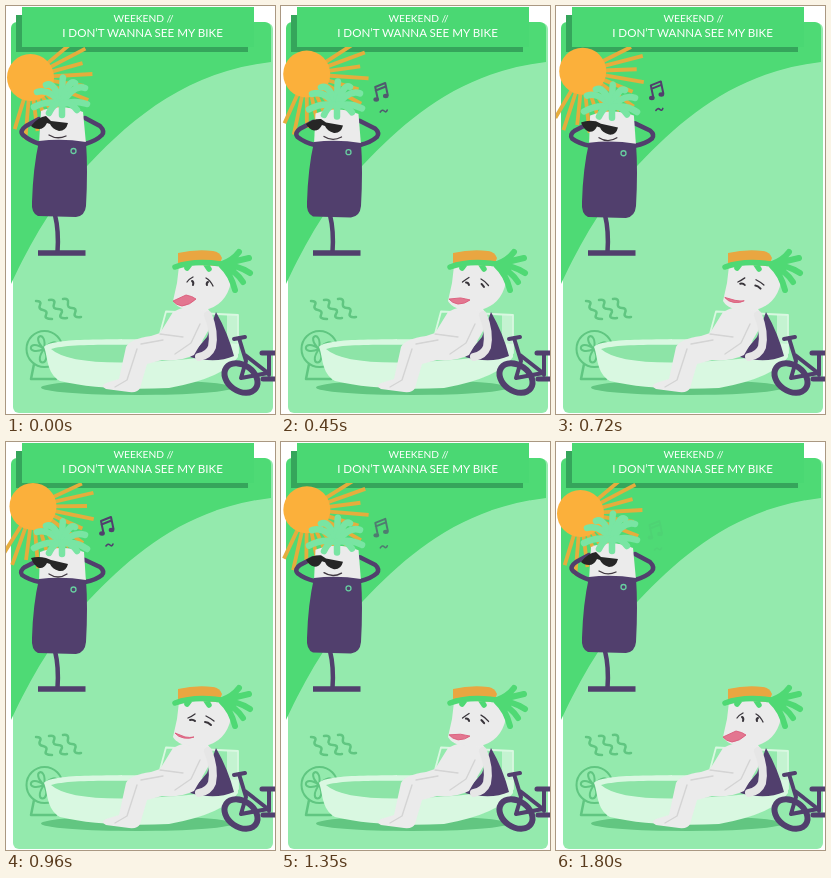
These frames come from a looping animation (269 by 408 pixels, 1830 ms). An HTML page:

```html
<!DOCTYPE html>
<html lang="en">
<head>
<meta charset="utf-8">
<title>Weekend</title>
<style>
html, body { margin: 0; width: 100%; height: 100%; overflow: hidden; background: #fff; }
svg { display: block; width: 269px; height: 408px; }
text { font-family: Lato, "Open Sans", sans-serif; fill: #fff; text-anchor: middle; }
.line { fill: none; stroke-linecap: round; stroke-linejoin: round; }
.ink { stroke: #513f6d; }
</style>
</head>
<body>
<svg viewBox="0 0 269 408">
  <clipPath id="card"><rect x="5" y="16" width="260" height="391" rx="6"/></clipPath>
  <rect x="7" y="17" width="260" height="390" rx="6" fill="#94eaad"/>
  <path clip-path="url(#card)" d="M0 0H269V55.500C185 64 130 108 82 159C47 196 25 236 5 278H0Z" fill="#4eda75"/>
  <path d="M10 9H242V46H10Z" fill="#35a55b"/>

  <!-- Sun -->
  <g id="sun">
    <g id="rays" stroke="#e5ad3d" stroke-width="3.800"></g>
    <circle r="23.500" fill="#fbb03b"/>
  </g>
  <path d="M16 1H248V41H16Z" fill="#4ad873"/>
  <text x="137.500" y="16" font-size="10.200">WEEKEND //</text>
  <text x="136.500" y="30.500" font-size="11.600">I DON’T WANNA SEE MY BIKE</text>

  <!-- Standing figure -->
  <g class="line ink" stroke-width="4.500">
    <path d="M49 209Q53 225 51.500 246"/>
    <path d="M32 247H79.500" stroke-width="5.500" stroke-linecap="butt"/>
    <path id="arms"/>
  </g>
  <path id="face" fill="#ebebeb"/>
  <path id="coat" fill="#513f6d"/>
  <circle id="badge" cx="67.500" r="2.500" fill="none" stroke="#67cfa0" stroke-width="1.300"/>
  <path id="glasses" fill="#262626"/>
  <path id="smile" class="line" stroke="#403840" stroke-width="1.300"/>
  <g id="hair" class="line" stroke="#79e5a3" stroke-width="6.500"></g>
  <g id="note" fill="#513f6d">
    <path class="line ink" d="M97.500 91L95 79L105 75L107.500 87M95.500 82.500L105.500 78.500" stroke-width="2"/>
    <ellipse cx="96" cy="91.500" rx="2.800" ry="2.200"/>
    <ellipse cx="105.500" cy="88" rx="2.800" ry="2.200"/>
    <path class="line ink" d="M100 104q2 -3 4 -1t3 -1" stroke-width="1.600"/>
  </g>

  <!-- Fan -->
  <g class="line" stroke="#60c681" stroke-width="2.500">
    <path d="M30 295q6 0 4 4t3 5t3 5t6 4M43 294q7 -1 5 4t4 5t3 5t6 4M57 293q6 -1 5 4t4 5t3 5t6 4"/>
    <circle cx="38.500" cy="343" r="18" stroke-width="2"/>
    <path d="M38 343C22 331 19 351 38 343C25 361 47 361 38 343C58 350 53 325 38 343C42 323 23 329 38 343" stroke-width="2"/>
    <path d="M28 358L25 373H50"/>
  </g>

  <!-- Pool -->
  <ellipse cx="131" cy="381.500" rx="96" ry="7.500" fill="#62c681"/>
  <path d="M221 308L232 309L231 348H221Z" fill="#c4f3d1"/>
  <path class="line" d="M152 335L160 305.500L232 309V347" stroke="#d9f8e1" stroke-width="1.800"/>
  <path d="M38 341C46 331 110 334 156 333L232 338V351Q218 372 163 382Q95 385 54 375C40 367 42 350 38 341Z" fill="#d9f8e1"/>
  <path d="M45 343C62 337 120 339 155 339L224 343Q210 352 155 355Q65 361 45 343Z" fill="#8de4a7"/>

  <!-- Reclining figure -->
  <path d="M184 351L201 331L210 306Q222 327 228 350Q210 358 184 351Z" fill="#513f6d"/>
  <path d="M167 306Q187 296 202 303Q207 308 202 325L188 349Q174 356 156 354L141 358L134 382Q132 387 123 386L100 383Q94 380 100 377L113 373L120 341Q124 333 145 330L154 327Z" fill="#ebebeb"/>
  <path class="line" d="M202 309Q209 326 206 341Q203 349 193 351" stroke="#e6e6e6" stroke-width="8"/>
  <path class="line" d="M154 328L177 331M135 338L157 334M131 343L121 374L109 381M194 318L185 337L169 348" stroke="#d4d4d4" stroke-width="1.400"/>
  <path d="M173 260Q199 251 222 258L225 276Q220 300 198 304Q173 306 167 295L171 277Z" fill="#ebebeb"/>
  <path d="M172 258V247Q190 243 207 245Q214 246 216 252L213 260Z" fill="#e9a641"/>
  <g class="line" stroke="#4fd974">
    <path d="M169 261Q188 254 215 258M184 258L181 262M199 257L203 263" stroke-width="5.500"/>
    <path d="M216 258Q227 254 233 246M216 258Q231 255 243 252M217 259Q232 259 244 267M217 260Q230 265 237 276M216 260Q225 268 229 284" stroke-width="6"/>
  </g>
  <g class="line" stroke="#38343a">
    <path id="brows" stroke-width="1.300"/>
    <path id="eyes" stroke-width="2"/>
  </g>
  <path id="mouth" fill="#e37690" stroke="#db5c7b" stroke-width=".9" stroke-linejoin="round"/>

  <!-- Bicycle -->
  <g class="line ink" stroke-width="4">
    <ellipse cx="235" cy="372" rx="18" ry="13" transform="rotate(35 235 372)" stroke-width="6"/>
    <path d="M228 333L239 331M233 332L240 355L235 372M239 349L262 367L235 372M263 347V369"/>
    <path d="M256 347H269M257 373H269" stroke-width="5"/>
  </g>
</svg>
<script>
const $ = id => document.getElementById(id);
const set = (id, name, value) => $(id).setAttribute(name, value);
const LOOP = 1830, STEP = 30;

// Blend the matching numbers of two paths.
function mix(a, b, u) {
  const ends = b.match(/-?[\d.]+/g);
  let i = 0;
  return a.replace(/-?[\d.]+/g, n => (+n + (ends[i++] - n) * u).toFixed(2));
}

const morphs = {
  arms: ["M34 138Q24 135 17 129Q13 125 20 120L33 113M79 138Q90 135 96 129Q99 125 94 120L79 112",
         "M34 140Q23 138 16 133Q13 129 19 125L31 119M79 140Q90 138 96 133Q99 129 94 125L79 118"],
  face: ["M33 138L35 105Q56 97 77 106L80 138Z",
         "M33 140L34 110Q56 102 78 110L80 140Z"],
  coat: ["M33 135Q56 132 80 136Q82 164 80 200Q79 210 70 211L32 210Q25 207 26 196Q27 162 33 135Z",
         "M33 137Q56 134 80 138Q82 165 80 200Q79 211 70 212L32 211Q25 208 26 196Q27 162 33 137Z"],
  glasses: ["M25 120Q32 111 40 110L45 115L62 117Q60 125 53 125Q46 123 44 118L41 117Q38 123 33 123Q28 123 25 120Z",
            "M25 116Q32 114 40 116L45 118L62 122Q60 130 53 129Q46 127 44 122L41 121Q38 127 33 126Q28 124 25 116Z"],
  smile: ["M43 129Q51 134 60 130", "M43 132Q52 138 61 132"],
  brows: ["M181 276Q183 273 187 271M200 272Q204 274 207 280",
          "M182 276Q185 275 189 272M200 274Q204 276 208 279"],
  eyes: ["M186 275Q188 276 187 279M202 276Q200 277 201 279",
         "M184 278Q187 277 189 279M199 280Q202 280 205 283"],
  mouth: ["M167 295L180 289Q186 290 190 293Q184 299 176 300Q170 299 167 295Z",
          "M169 291L179 295Q184 296 188 295Q184 297 178 296Q172 295 169 291Z"]
};

// Each leaf arches from the crown to its tip: x, raised y, lowered y.
const leaves = [
  [28, 101, 106], [31, 86, 90], [40, 79, 84], [57, 72, 80], [69, 77, 85],
  [79, 82, 93], [81, 98, 107], [43, 107, 111], [56, 109, 112], [71, 104, 109]
];

for (let i = 0; i < 13; i++)
  $("rays").innerHTML += `<path d="M20 0H${i % 2 ? 62 : 54}" transform="rotate(${-40 + i * 12.25})"/>`;
$("hair").innerHTML = "<path/>".repeat(leaves.length);

function draw(now) {
  const t = Math.floor(now % LOOP / STEP) * STEP;
  const u = (1 - Math.cos(2 * Math.PI * t / LOOP)) / 2;

  set("sun", "transform", `translate(${24.5 + 2.5 * u} ${71.5 - 7 * u})`);
  set("rays", "transform", `rotate(${15 * u})`);
  for (const id in morphs) set(id, "d", mix(...morphs[id], u));
  set("badge", "cy", 145 + 2.5 * u);
  set("note", "transform", `translate(${-1.5 * (1 - u)} ${4 * (1 - u)})`);
  set("note", "opacity", Math.min(1, t / 550, (LOOP - t) / 800 * (t > 0)));

  [...$("hair").children].forEach((leaf, i) => {
    const [x, high, low] = leaves[i];
    const y = high + (low - high) * u, crown = 98 + 4 * u;
    leaf.setAttribute("d", `M56 ${crown}Q${(x + 56) / 2} ${Math.min(y, crown) - 4} ${x} ${y}`);
  });
  requestAnimationFrame(draw);
}
const start = performance.now();
requestAnimationFrame(now => draw(Math.max(0, now - start)));
</script>
</body>
</html>
```
